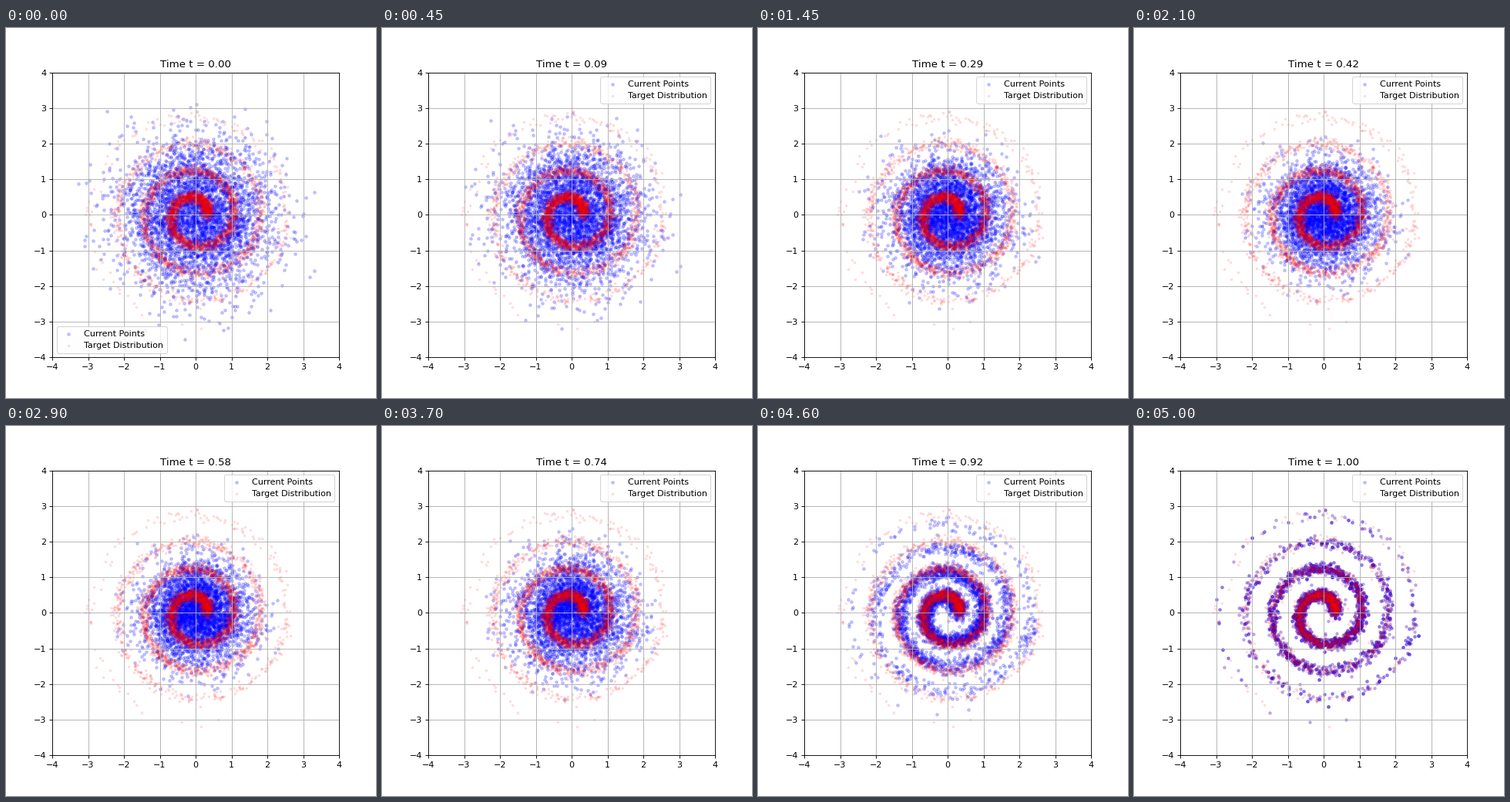
Recreate the animation shown at these times as a matplotlib script. Size 480 by 480 pixels, loop 5.05 s.

```python
import numpy as np
import matplotlib.pyplot as plt
from matplotlib.animation import FuncAnimation

STEPS = 100
COUNT = 4000
TURNS = 4
LEGEND_SWITCH = 8  # upper right corner is clear of points from here on


def make_spiral(rng):
    """Spiral that is dense at the centre and thins outwards."""
    u = 1 - rng.random(COUNT) ** 0.4
    angle = 2 * np.pi * TURNS * u
    radius = 0.31 + 3.0 * u
    curve = radius * np.array([np.cos(angle), np.sin(angle)])
    return curve.T + rng.normal(0, 0.085, (COUNT, 2))


def expected_target(x, y, t):
    """Mean of the targets y given position x at time t."""
    w = x @ (y * t / (1 - t) ** 2).T
    w -= 0.5 * t ** 2 * (y ** 2).sum(axis=1) / (1 - t) ** 2
    w -= w.max(axis=1, keepdims=True)
    np.exp(w, out=w)
    return (w @ y) / w.sum(axis=1, keepdims=True)


def integrate(cloud, spiral):
    """Euler steps of the flow from the cloud to the spiral."""
    x = cloud.astype(np.float32)
    y = spiral.astype(np.float32)
    path = [x]
    for k in range(STEPS):
        t = k / STEPS
        goals = y[:1000] if t < 0.6 else y  # the early field is smooth
        mean = np.concatenate([expected_target(part, goals, t)
                               for part in np.split(x, 8)])
        x = x + (mean - x) / (STEPS - k)
        path.append(x)
    return path


rng = np.random.default_rng(7)
spiral = make_spiral(rng)
path = integrate(rng.normal(size=(COUNT, 2)), spiral)

fig, ax = plt.subplots(figsize=(6, 6), dpi=80)
points = ax.scatter(*path[0].T, s=10, c="blue", alpha=0.2, label="Current Points")
ax.scatter(*spiral.T, s=5, c="red", alpha=0.1, label="Target Distribution")
ax.set_xlim(-4, 4)
ax.set_ylim(-4, 4)
ax.grid(True)
title = ax.set_title("Time t = 0.00")
legend = ax.legend(loc="lower left")


def update(k):
    points.set_offsets(path[k])
    title.set_text(f"Time t = {k / STEPS:.2f}")
    legend.set_loc("lower left" if k < LEGEND_SWITCH else "upper right")
    return points, title, legend


anim = FuncAnimation(fig, update, frames=STEPS + 1, interval=50,
                     repeat=True, repeat_delay=0)
plt.show()
```
